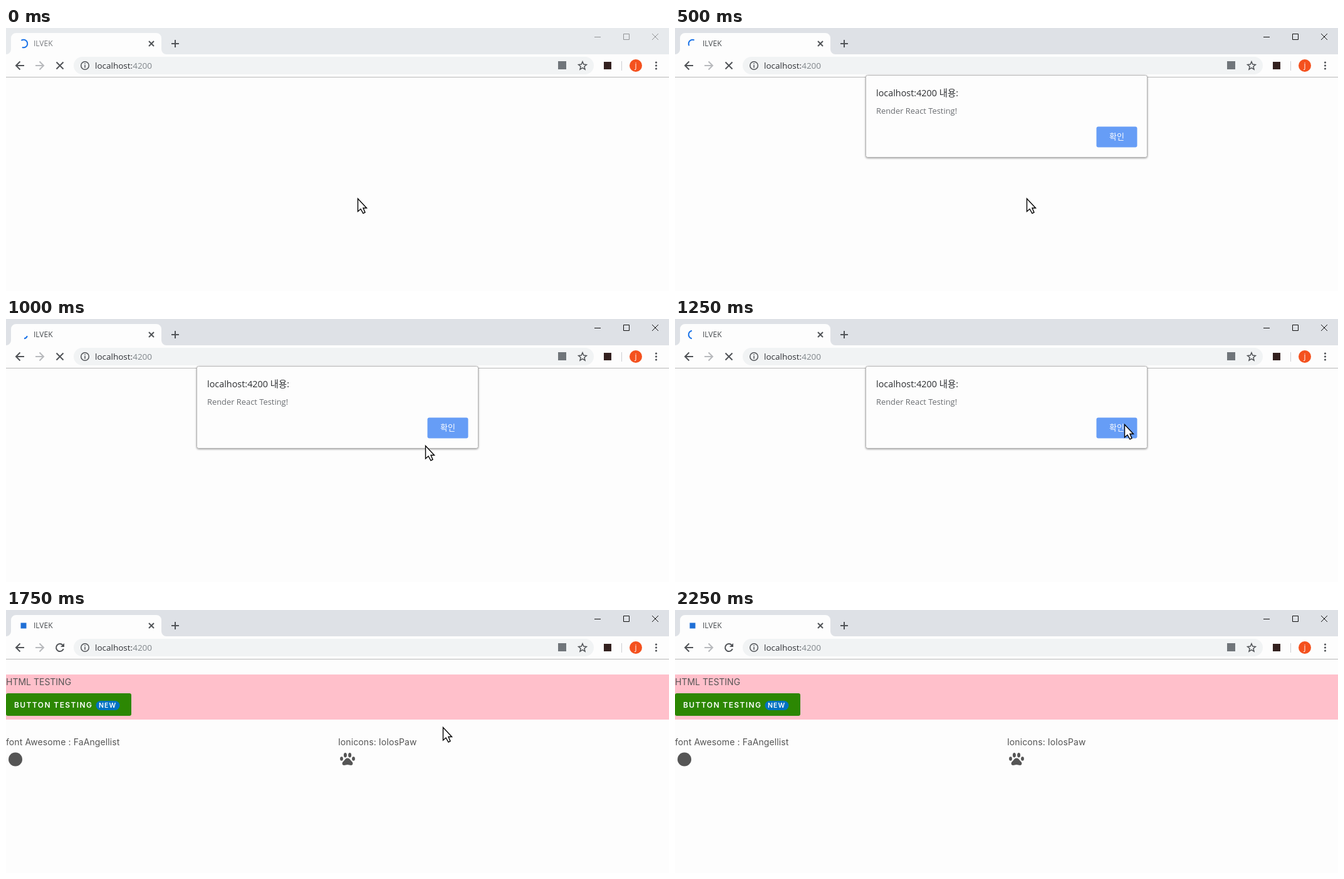
Animation of 1058x420 px, one loop 2750 ms. Source, as an HTML page:

```html
<!DOCTYPE html>
<html lang="ko">
<head>
<meta charset="utf-8">
<title>Render test</title>
<style>
  html, body { margin: 0; width: 100%; height: 100%; overflow: hidden; background: #fdfdfd; }
  svg { display: block; font-family: 'Open Sans', 'Noto Sans CJK KR', 'Noto Sans CJK', sans-serif; }
  .line { fill: none; stroke: #505357; stroke-width: 2; }
  .page { font: 14px Inter, sans-serif; fill: #555; }
  .caps { font-weight: 600; fill: #fff; }
  #box { filter: drop-shadow(0 1px 1.5px #0006); }
</style>
</head>
<body>
<svg width="1058" height="420" viewBox="0 0 1058 420">
  <rect width="1058" height="420" fill="#fdfdfd"/>

  <!-- tab strip -->
  <rect id="strip" width="1058" height="42"/>
  <path fill="#fdfdfd" d="M0 42a8 8 0 0 0 8-8V16a8 8 0 0 1 8-8H240a8 8 0 0 1 8 8v18a8 8 0 0 0 8 8z"/>
  <circle id="spinner" cx="28" cy="25" r="6.3" pathLength="360" fill="none" stroke="#1a73e8" stroke-width="2"/>
  <rect id="favicon" x="23.5" y="20.5" width="9" height="9" fill="#1f6fd6"/>
  <text id="tabTitle" x="44" y="29" font-size="12">ILVEK</text>
  <path class="line" stroke-width="1.7" d="M228 21l8 8m0-8l-8 8M264 25h12m-6-6v12"/>
  <path id="controls" fill="none" d="M939 14.5h10M985.5 9.5h9v9h-9zM1031 9l10 10m0-10l-10 10"/>

  <!-- toolbar -->
  <path stroke="#b8b8b8" d="M0 78.5h1058"/>
  <rect x="108" y="46" width="830" height="28" rx="14" fill="#f1f3f4"/>
  <path class="line" d="M29 60H16m6.5-6.5L16 60l6.5 6.5"/>
  <path class="line" style="stroke:#b8babd" d="M47 60h13m-6.5-6.5L60 60l-6.5 6.5"/>
  <path id="stop" class="line" d="M80.5 54.5l11 11m0-11l-11 11"/>
  <g id="reload">
    <path class="line" d="M90.5 56A6 6 0 1 0 91.7 62"/>
    <path fill="#505357" d="M93 53v6h-6z"/>
  </g>
  <g class="line" style="stroke-width:1.5">
    <circle cx="126" cy="60" r="6.3"/>
    <path d="M126 59v4.5m0-7.2v1.5"/>
    <path d="M920 53.8l1.8 4.3 4.6.4-3.5 3 1.1 4.6-4-2.4-4 2.4 1.1-4.6-3.5-3 4.6-.4z"/>
  </g>
  <text x="142" y="65" font-size="13.5" fill="#303236">localhost:<tspan fill="#80868b">4200</tspan></text>
  <rect x="881" y="53" width="13" height="13" fill="#70757a"/>
  <rect x="954" y="54" width="12" height="12" fill="#33211f"/>
  <path stroke="#cdcfd2" d="M982.5 53v15"/>
  <circle cx="1005" cy="60" r="10" fill="#f4511e"/>
  <text x="1005" y="64" font-size="12" text-anchor="middle" fill="#fff">j</text>
  <g fill="#505357">
    <circle cx="1037.5" cy="55" r="1.6"/>
    <circle cx="1037.5" cy="60" r="1.6"/>
    <circle cx="1037.5" cy="65" r="1.6"/>
  </g>

  <!-- loaded page -->
  <g id="page" class="page">
    <rect y="103" width="1058" height="72" fill="#ffc0cb"/>
    <text y="120">HTML TESTING</text>
    <rect y="133" width="200" height="36" rx="3" fill="#2c8703"/>
    <text class="caps" x="13" y="156" font-size="12" letter-spacing="1.4" style="font-size:12px">BUTTON TESTING</text>
    <rect x="143.5" y="145" width="38" height="15" rx="7.5" fill="#0072c3"/>
    <text class="caps" x="148" y="156" letter-spacing="1.1" style="font-size:10.5px">NEW</text>
    <text y="216" letter-spacing=".1">font Awesome : FaAngellist</text>
    <text x="530" y="216" letter-spacing=".1">Ionicons: IoIosPaw</text>
    <circle cx="15" cy="238.5" r="11"/>
    <ellipse cx="535.5" cy="237.5" rx="2.4" ry="3.2"/>
    <ellipse cx="541.4" cy="231.7" rx="2.5" ry="3.8"/>
    <ellipse cx="548.6" cy="231.7" rx="2.5" ry="3.8"/>
    <ellipse cx="554.5" cy="237.5" rx="2.4" ry="3.2"/>
    <path d="M545 236.5c3.5 0 4.5 3.5 7 5.5 2.5 2.500 1.500 6-1.500 6-2 0-3.500-1-5.500-1s-3.500 1-5.500 1c-3 0-4-3.500-1.500-6 2.500-2 3.500-5.500 7-5.500z"/>
  </g>

  <!-- alert -->
  <g id="dialog">
    <rect id="box" x="304.500" y="75.500" width="449" height="131" rx="3" fill="#fdfdfd" stroke="#b4b4b4"/>
    <g id="content">
      <text x="321" y="109" font-size="14.400" fill="#2b2d30">localhost:4200 내용:</text>
      <text x="321" y="137" font-size="12.900" fill="#6b6e72">Render React Testing!</text>
      <rect x="672.500" y="157.500" width="65" height="33" rx="3" fill="#669df6"/>
      <text x="705" y="178" font-size="13" text-anchor="middle" fill="#fff">확인</text>
    </g>
  </g>

  <path id="cursor" fill="#fff" stroke="#000" stroke-width="1.400" d="M.5 .5V21l4.500-4 4 7 3-1.500-3-7h5.500z"/>
</svg>
<script>
const LOOP = 2750, TICK = 250, LOADED = 6, CLOSED = 7;
const el = id => document.getElementById(id);
const show = (id, on) => el(id).style.display = on ? '' : 'none';

// Spinner [start angle, sweep] per tick while loading
const arcs = [[-125, 235], [-45, 295], [150, 145], [-70, 20], [20, 60], [100, 160]];
// Pointer tip per tick; off stage after the last one
const rest = [561, 272];
const tips = [rest, rest, rest, rest, [669, 202], [717, 168], [708, 171], [697, 187], [499, 416]];

function draw() {
  const tick = Math.floor(performance.now() % LOOP / TICK);
  const focused = tick > 0, loaded = tick >= LOADED, closing = tick === LOADED;

  el('strip').setAttribute('fill', focused ? '#dee1e6' : '#e7eaed');
  el('tabTitle').setAttribute('fill', focused ? '#45494d' : '#777a7e');
  el('controls').setAttribute('stroke', focused ? '#111' : '#929496');

  show('spinner', !loaded);
  show('stop', !loaded);
  for (const id of ['favicon', 'reload', 'page']) show(id, loaded);
  if (!loaded) {
    const [start, sweep] = arcs[tick];
    el('spinner').setAttribute('transform', `rotate(${start} 28 25)`);
    el('spinner').setAttribute('stroke-dasharray', `${sweep} 360`);
  }

  show('dialog', focused && tick < CLOSED);
  el('dialog').setAttribute('transform', `translate(0 ${closing ? -5.5 : 0})`);
  el('content').setAttribute('opacity', closing ? 0.9 : 1);

  const tip = tips[tick];
  show('cursor', tip);
  if (tip) el('cursor').setAttribute('transform', `translate(${tip})`);
  requestAnimationFrame(draw);
}
draw();
</script>
</body>
</html>
```
